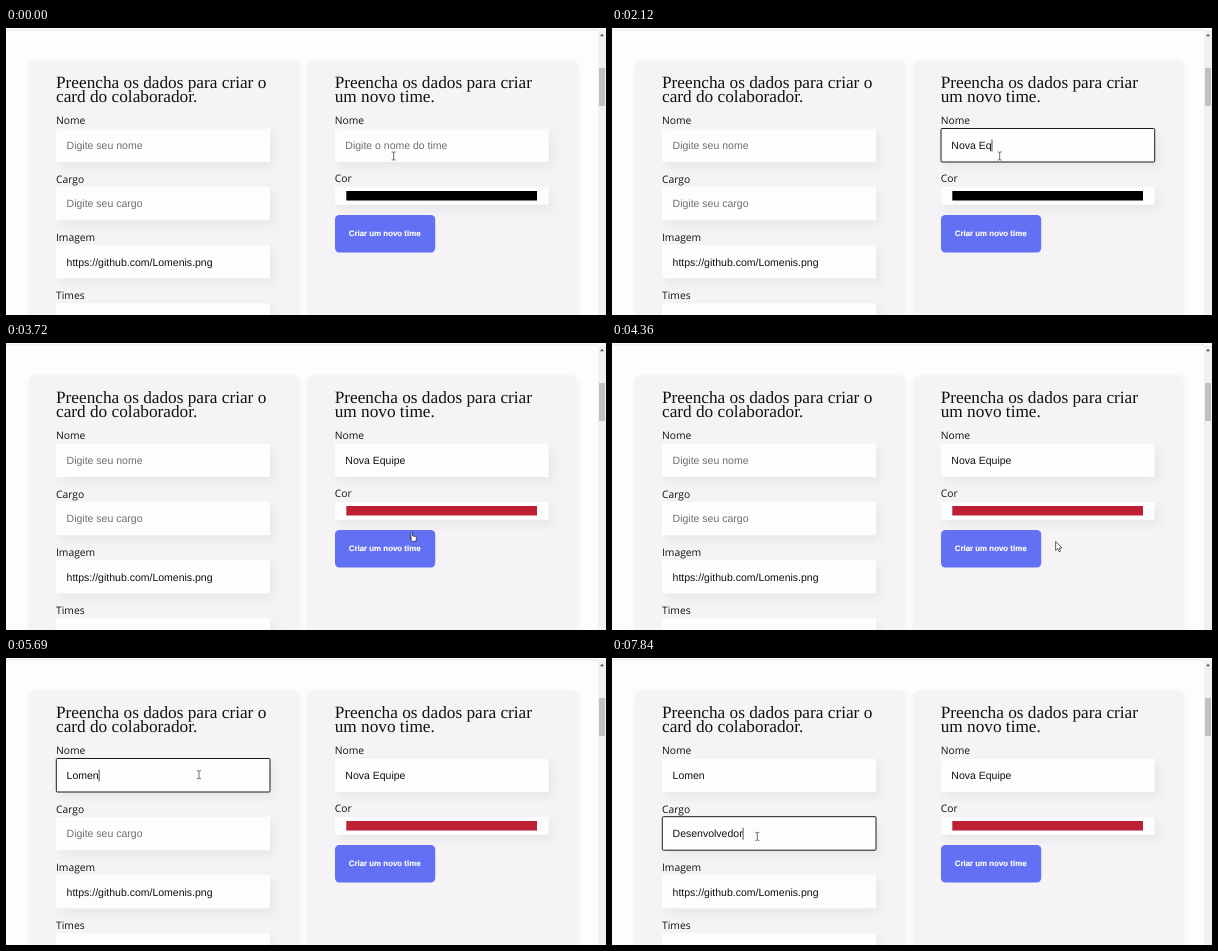
An HTML page that plays this animation: 600x287 px, repeating every 8000 ms.

```html
<!DOCTYPE html>
<html lang="pt-BR">
<head>
<meta charset="utf-8">
<title>Formulários</title>
<style>
  html, body { margin: 0; width: 100%; height: 100%; overflow: hidden; background: #fdfcfe; }
  svg { display: block; width: 100%; height: 100%; }
  text { white-space: pre; fill: #111; text-rendering: geometricPrecision; }
  .title { font: 17.25px "Liberation Serif", "Times New Roman", serif; }
  .label { font: 10.3px "Open Sans", "Noto Sans", sans-serif; }
  .value { font: 10.5px "Liberation Sans", Arial, sans-serif; }
  .hint { fill: #6e6e6e; }
  .button { font: bold 7.9px "Liberation Sans", Arial, sans-serif; fill: #fff; stroke: #fff; stroke-width: .15; }
  .panel { fill: #f5f3f6; filter: drop-shadow(1px 2px 3px rgba(0, 0, 0, .04)); }
  .box { fill: #fefdfe; filter: drop-shadow(4px 5px 5px rgba(0, 0, 0, .05)); }
  .ring { fill: none; stroke: #1a1a1a; stroke-width: 1; }
</style>
</head>
<body>
<svg viewBox="0 0 600 287">
  <rect width="600" height="287" fill="#fdfcfe"/>
  <rect y="1.5" width="592" height="1" fill="#e4e3e5"/>

  <rect class="panel" x="22.5" y="32" width="271" height="300" rx="7"/>
  <rect class="panel" x="301" y="32" width="271" height="300" rx="7"/>

  <rect x="592" y="2" width="8" height="285" fill="#f1f1f1"/>
  <rect x="593" y="40" width="6" height="38" fill="#c1c1c1"/>
  <path d="M594 8.2l2-2.4 2 2.4z" fill="#555"/>

  <text class="title" x="50" y="59.8">Preencha os dados para criar o</text>
  <text class="title" x="50" y="73.8">card do colaborador.</text>
  <text class="title" x="328.7" y="59.8">Preencha os dados para criar</text>
  <text class="title" x="328.7" y="73.8">um novo time.</text>

  <g id="fields"></g>

  <text class="label" x="328.7" y="154.4">Cor</text>
  <rect class="box" x="329" y="159" width="213.6" height="17.7"/>
  <rect id="swatch" x="340.3" y="163" width="190.7" height="9.5"/>
  <rect x="329" y="187" width="100.2" height="37.5" rx="4.5" fill="#6270f3"/>
  <text class="button" x="342.7" y="208.2">Criar um novo time</text>

  <g id="cursor">
    <path data-shape="beam" d="M-2-4h1.4l.6.6.6-.6H2M0-3.4v6.8M-2 4h1.4l.6-.6.6.6H2" fill="none" stroke="#444" stroke-width=".8"/>
    <path data-shape="arrow" d="M0 0v9l2.1-1.9 1.4 3.2 1.4-.6-1.4-3.1h2.8z" fill="#fff" stroke="#222" stroke-width=".7"/>
    <path data-shape="hand" d="M-1 4V-2.6q.8-1.2 1.6 0V.4l3 .7q.9.3.8 1.3L4 5.8H.2L-2.6 2.4q.5-1 1.6-.1z" fill="#fff" stroke="#222" stroke-width=".7"/>
  </g>
</svg>

<script>
const LOOP = 8000;
const $ = id => document.getElementById(id);

function make(tag, attrs, parent) {
  const el = document.createElementNS('http://www.w3.org/2000/svg', tag);
  for (const k in attrs) el.setAttribute(k, attrs[k]);
  return parent.appendChild(el);
}

// focus: [from, to]; keys: the time each character appears
const fields = [
  { x: 50, y: 100.7, label: 'Nome', hint: 'Digite seu nome', text: 'Lomen',
    focus: [5090, 6160], keys: [5240, 5340, 5430, 5560, 5690] },
  { x: 50, y: 158.9, label: 'Cargo', hint: 'Digite seu cargo', text: 'Desenvolvedor',
    focus: [6160, LOOP],
    keys: [6580, 6660, 6740, 6820, 6900, 6980, 7080, 7180, 7340, 7460, 7560, 7680, 7800] },
  { x: 50, y: 217.1, label: 'Imagem', text: 'https://github.com/Lomenis.png' },
  { x: 50, y: 275.3, label: 'Times', text: '' },
  { x: 328.7, y: 100.7, label: 'Nome', hint: 'Digite o nome do time', text: 'Nova Equipe',
    focus: [40, 3120],
    keys: [300, 520, 740, 900, 1060, 1990, 2080, 2200, 2290, 2400, 2500] },
];

for (const f of fields) {
  const g = $('fields');
  make('text', { class: 'label', x: f.x, y: f.y - 4.4 }, g).textContent = f.label;
  make('rect', { class: 'box', x: f.x, y: f.y, width: 214, height: 33.3 }, g);
  f.value = make('text', { class: 'value', x: f.x + 10.6, y: f.y + 20.4 }, g);
  f.value.textContent = f.text;
  if (!f.keys) continue;
  f.ring = make('rect', { class: 'ring', x: f.x + .3, y: f.y - .2, width: 213.7, height: 33.5, rx: 1 }, g);
  f.caret = make('rect', { y: f.y + 10.8, width: .8, height: 12, fill: '#222' }, g);
}

const show = (el, on) => el.setAttribute('visibility', on ? 'visible' : 'hidden');

function drawField(f, t) {
  const count = f.keys.filter(k => k <= t).length;
  const focused = t >= f.focus[0] && t < f.focus[1];
  f.value.textContent = count ? f.text.slice(0, count) : f.hint;
  f.value.classList.toggle('hint', !count);
  show(f.ring, focused);

  const idle = count ? t - f.keys[count - 1] : 0;
  const lit = idle < 530 || idle >= 750;
  show(f.caret, focused && count && lit);
  if (count) f.caret.setAttribute('x', f.x + 10.6 + f.value.getComputedTextLength());
}

// time, x, y
const path = [
  [0, 387.7, 128], [2880, 387.7, 128], [3160, 399, 168], [3440, 399, 168],
  [3680, 406, 192.5], [3740, 406, 192.5], [4000, 476, 209], [4200, 476, 209],
  [4960, 193, 116.7], [5890, 193, 116.7], [6160, 145.3, 178.4], [LOOP, 145.3, 178.4],
];

function cursorAt(t) {
  const i = path.findIndex(p => p[0] > t);
  const [t0, x0, y0] = path[i - 1], [t1, x1, y1] = path[i];
  const u = (t - t0) / (t1 - t0), e = u * u * (3 - 2 * u);
  return [x0 + (x1 - x0) * e, y0 + (y1 - y0) * e];
}

const inside = (x, y, l, t, w, h) => x >= l && x <= l + w && y >= t && y <= t + h;

function drawCursor(t) {
  const [x, y] = cursorAt(t);
  const shape = fields.some(f => inside(x, y, f.x, f.y, 214, 33.5)) ? 'beam'
    : inside(x, y, 329, 187, 100, 37) ? 'hand' : 'arrow';
  $('cursor').setAttribute('transform', `translate(${x} ${y})`);
  for (const el of $('cursor').children) show(el, el.dataset.shape === shape);
}

function draw(now) {
  const t = now % LOOP;
  for (const f of fields) if (f.keys) drawField(f, t);
  $('swatch').setAttribute('fill', t < 3400 ? '#000' : '#bd1f35');
  drawCursor(t);
}

let start;
function tick(now) {
  start ??= now;
  draw(Math.max(0, now - start));
  requestAnimationFrame(tick);
}
draw(0);
requestAnimationFrame(tick);
</script>
</body>
</html>
```
